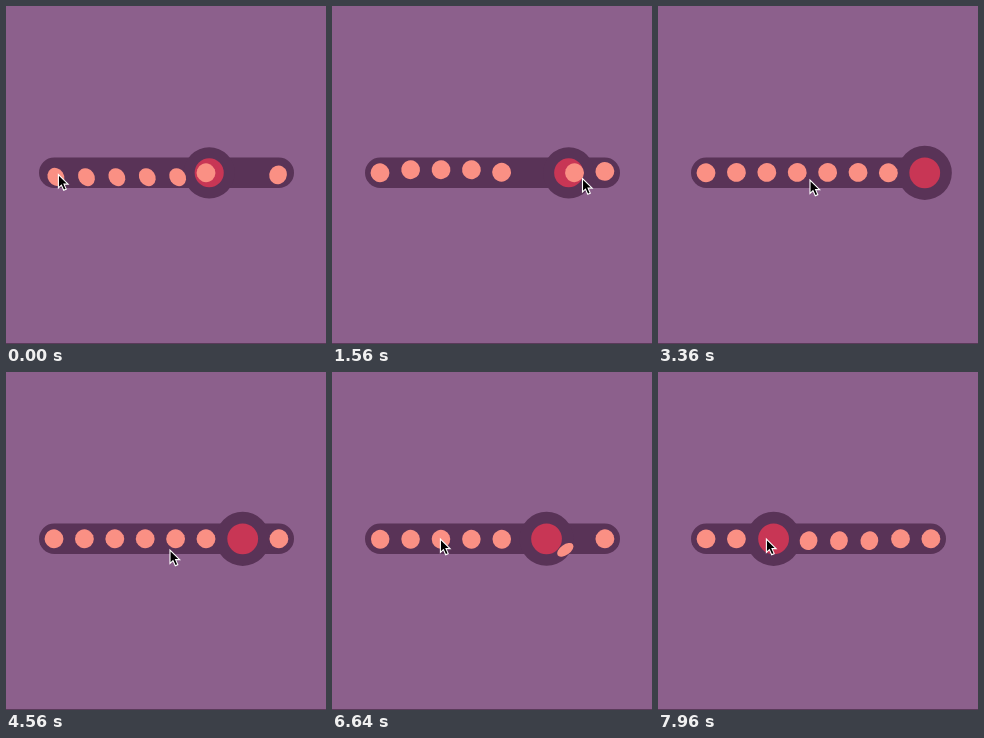
Animation of 320x338 px, one loop 8000 ms. Source, as an HTML page:

```html
<!DOCTYPE html>
<html lang="en">
<head>
<meta charset="utf-8">
<title>Dot pager</title>
<style>
html, body { margin: 0; width: 100%; height: 100%; overflow: hidden; background: #8c608c; }
svg { display: block; width: 100%; height: 100%; }
</style>
</head>
<body>
<svg viewBox="0 0 320 338">
  <rect width="320" height="338" fill="#8c608c"/>
  <rect y="337" width="320" height="1" fill="#5a3a5a"/>
  <g fill="#593357">
    <rect x="33" y="151.6" width="255" height="30.4" rx="15.2"/>
    <circle id="halo"/>
  </g>
  <circle id="ball" fill="#c83655"/>
  <g id="dots" fill="#fa9084"></g>
  <path id="cursor" d="M0 0V13.4L3 10.6L5.3 15.7L7.8 14.6L5.6 9.6H9.7Z" fill="#000" stroke="#fff" stroke-width="1.1"/>
</svg>
<script>
const LOOP = 8000, CY = 166.8, COUNT = 7, STEP = 30.4, SWING = 21.25;
const HOME = 7, EASE = 185;

// moment and page of each ball move
const moves = [[-65, 0], [1200, 7], [3640, 6], [4600, 4], [5200, 6], [6604, 2]];

// moment the pointer sets off, and where to
const REST = [52.4, 168.5], TRAVEL = 420;
const trips = [
  [1000, 270, 171], [1450, 157, 180], [2600, 152, 174], [3400, 229, 172],
  [3850, 164, 178], [4620, 272, 172], [5440, 108.4, 167]
];

const $ = id => document.getElementById(id);
const clamp = v => Math.min(1, Math.max(0, v));
const mix = (a, b, p) => a + (b - a) * p;
const smooth = (a, b, t) => { const p = clamp((t - a) / (b - a)); return p * p * (3 - 2 * p); };
const set = (el, attrs) => { for (const k in attrs) el.setAttribute(k, attrs[k]); };
const pageX = page => 55 + 30.25 * page;
const leftX = i => 48 + STEP * i;
const glide = t => 1 - Math.exp(-t / EASE);

const dots = Array.from({ length: COUNT }, () => {
  const el = document.createElementNS("http://www.w3.org/2000/svg", "ellipse");
  return $("dots").appendChild(el);
});

function currentMove(t) {
  let from = HOME, startX = pageX(HOME), move;
  for (const [start, to] of moves) {
    if (start > t) break;
    if (move) {
      startX = mix(startX, pageX(move.to), glide(start - move.start));
      from = move.to;
    }
    move = { start, from, to, startX, age: t - start };
  }
  return move;
}

function drawDot(i, move, ballX) {
  const { age, from, to, startX } = move;
  const goesLeft = to < from;
  const flips = i >= Math.min(from, to) && i < Math.max(from, to);
  const first = i === (goesLeft ? from - 1 : from);
  let angle = i >= from ? 0 : Math.PI;

  // a dot swings to the other side once the ball reaches it
  if (flips) {
    const slot = leftX(i) + (goesLeft ? 0 : 2 * SWING);
    const share = Math.min(0.95, clamp((slot - startX) / (pageX(to) - startX)));
    const delay = first ? 0 : -EASE * Math.log(1 - share);
    const u = Math.max(0, age - delay) / (first ? 29 : 50);
    angle = mix(angle, goesLeft ? 0 : Math.PI, 1 - Math.exp(-(u ** 1.5)));
  }

  // shared springy sway of the dots around their slots
  const pivot = leftX(i) + SWING;
  const sways = !first && (flips || (goesLeft && from - to > 1 && i < to));
  if (sways && age > 34) {
    const t = age - 34;
    const fade = flips && i > 0 && i < COUNT - 1 ? 650 : 250;
    const room = clamp((Math.abs(ballX - pivot - SWING * Math.cos(angle)) - 5) / 25);
    angle += 0.7 * Math.exp(-t / fade) * Math.sin(2 * Math.PI * t / 588) * Math.cos(angle) * room;
  }

  const c = Math.cos(angle), s = Math.sin(angle), depth = Math.max(0, s);
  const r = SWING * (1 - 0.34 * depth);
  const tilt = angle * 180 / Math.PI + 22 * c * Math.abs(c);
  set(dots[i], {
    rx: 9.4 * (1 - 0.68 * depth), ry: 9.4,
    transform: `translate(${pivot + r * c} ${CY + r * s}) rotate(${tilt})`
  });
}

function drawPointer(t) {
  let [x, y] = REST;
  for (const [leave, toX, toY] of trips) {
    const p = smooth(leave, leave + TRAVEL, t);
    x = mix(x, toX, p);
    y = mix(y, toY, p);
  }
  set($("cursor"), { transform: `translate(${x} ${y})` });
}

function draw(t) {
  const move = currentMove(t);
  const x = mix(move.startX, pageX(move.to), glide(move.age));
  const scale = 1 - 0.055 * smooth(34, 65, move.age) * (1 - smooth(780, 920, move.age));
  set($("halo"), { cx: x, cy: CY, r: 27.1 * scale });
  set($("ball"), { cx: x, cy: CY, r: 15.4 * scale });
  dots.forEach((_, i) => drawDot(i, move, x));
  drawPointer(t);
}

const begin = performance.now();
function tick() {
  draw((performance.now() - begin) % LOOP);
  requestAnimationFrame(tick);
}
tick();
</script>
</body>
</html>
```
